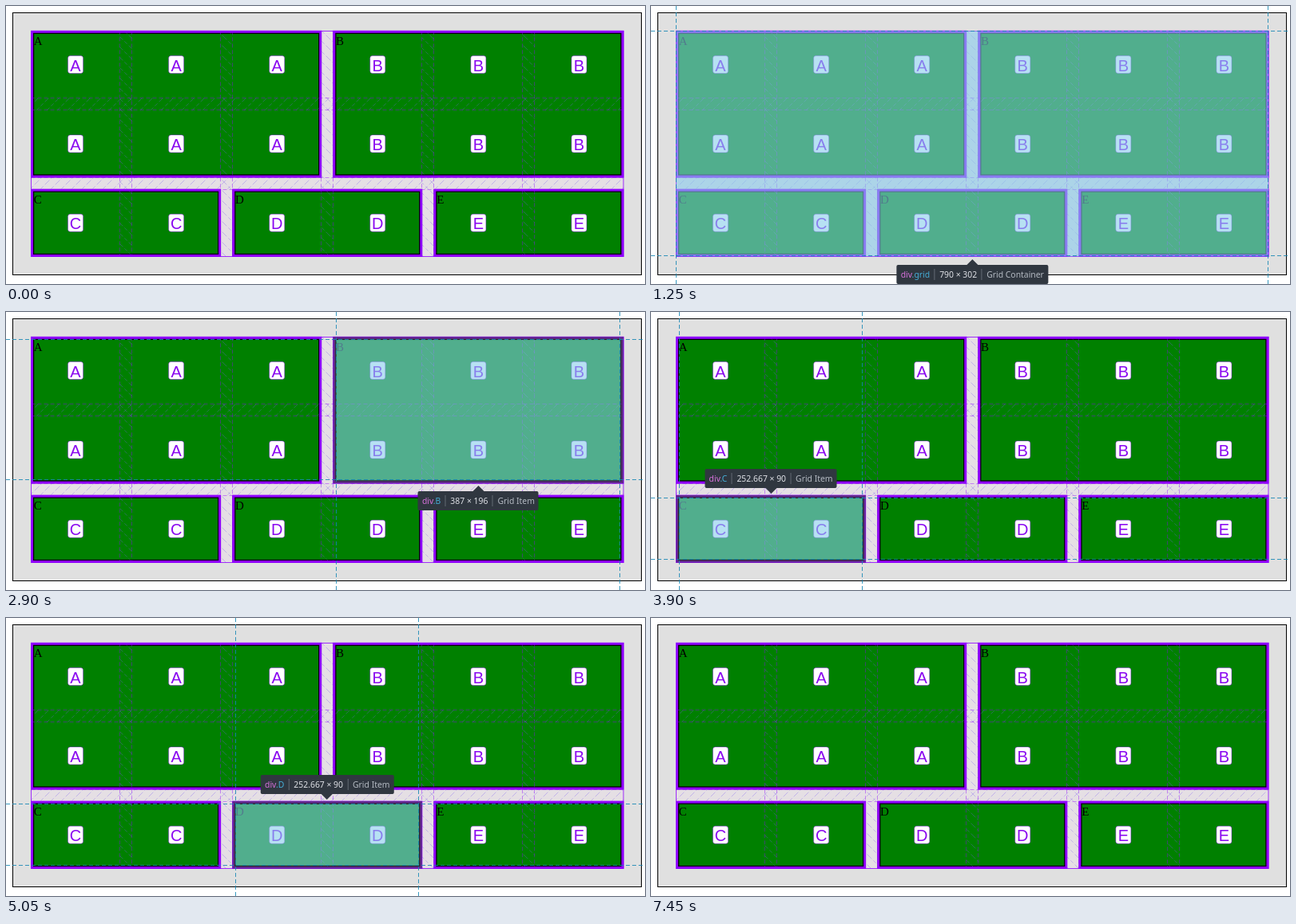
Recreate the animation shown at these times as an HTML page. Size 800 by 349 pixels, loop 8000 ms.

```html
<!DOCTYPE html>
<html lang="en">
<head>
<meta charset="utf-8">
<title>Grid inspector</title>
<style>
  html, body { margin: 0; width: 100%; height: 100%; overflow: hidden; background: #fff; }
  svg { position: absolute; left: 0; top: 0; display: block; }
  .corner { font: 15px "Liberation Serif", serif; }
  .badge { font: 20px "Liberation Sans", sans-serif; fill: #8a08f0; text-anchor: middle; }
  #tip {
    position: absolute; display: flex; align-items: center; height: 24px; padding: 0 5px;
    transform: translateX(-50%); border-radius: 2px; background: #303740; white-space: pre;
    font: 10.4px "Noto Sans", "Open Sans", sans-serif; color: #dfe1e6;
  }
  #tip span + span { margin-left: 5.5px; padding-left: 5.5px; border-left: 1px solid #626a73; }
  #tip b { font-weight: normal; color: #d872dc; }
  #tip i { font-style: normal; color: #45add6; }
  #tip .role { color: #b4bac2; }
  #tip::after {
    content: ""; position: absolute; left: 50%; margin-left: -7px;
    border: 7px solid transparent; border-top-width: 0; border-bottom: 7px solid #303740; top: -7px;
  }
  #tip.above::after { top: 24px; border-top: 7px solid #303740; border-bottom-width: 0; }
  #tip.plain::after { display: none; }
</style>
</head>
<body>
<svg id="stage" width="800" height="349" viewBox="0 0 800 349">
  <defs>
    <pattern id="cols" width="13" height="13" patternUnits="userSpaceOnUse">
      <path d="M0 0L13 13" stroke="#7a5cf0" stroke-opacity=".34" stroke-dasharray="4.7 2.8"/>
    </pattern>
    <pattern id="rows" width="13" height="13" patternUnits="userSpaceOnUse">
      <path d="M13 0L0 13" stroke="#7a5cf0" stroke-opacity=".34" stroke-dasharray="4.7 2.8"/>
    </pattern>
  </defs>
  <g id="page"></g>
  <g id="grid"></g>
  <g id="mark"></g>
</svg>
<div id="tip"></div>
<script>
const $ = id => document.getElementById(id);
const LOOP = 8000, PURPLE = '#8f00ff';
const X0 = 31.5, Y0 = 31.3, X1 = 773, Y1 = 314.5, GAP = 15, BORDER = 3.75;
const COL = (X1 - X0 - 5 * GAP) / 6, ROW = (Y1 - Y0 - 2 * GAP) / 3;
const colX = c => X0 + c * (COL + GAP);
const rowY = r => Y0 + r * (ROW + GAP);
const snap = v => Math.floor(v) + 0.5;

const tag = (name, attrs, text = '') =>
  `<${name} ${Object.entries(attrs).map(([k, v]) => `${k}="${v}"`).join(' ')}>${text}</${name}>`;
const rect = ([l, t, r, b], attrs) =>
  tag('rect', { x: l, y: t, width: r - l, height: b - t, ...attrs });
const line = (x1, y1, x2, y2, attrs) => tag('line', { x1, y1, x2, y2, ...attrs });
const inset = ([l, t, r, b], d) => [l + d, t + d, r - d, b - d];

// name: first column, first row, column span, row span
const areas = { A: [0, 0, 3, 2], B: [3, 0, 3, 2], C: [0, 2, 2, 1], D: [2, 2, 2, 1], E: [4, 2, 2, 1] };
const areaBox = ([c, r, w, h]) =>
  [colX(c), rowY(r), colX(c + w - 1) + COL, rowY(r + h - 1) + ROW];

const all = [X0, Y0, X1, Y1];
const bodyBox = [8, 8, 796, 338];

function drawPage() {
  let out = rect(bodyBox, { fill: '#000' }) + rect(inset(bodyBox, 1), { fill: '#e0e0e0' });
  out += rect(all, { fill: '#e5dfe4' });
  for (const name in areas) {
    const box = areaBox(areas[name]);
    out += rect(box, { fill: '#000' }) + rect(inset(box, BORDER), { fill: '#008000' });
    out += tag('text', { x: box[0] + 3.3, y: box[1] + 17.5, class: 'corner' }, name);
  }
  $('page').innerHTML = out;
}

function drawGrid() {
  const dash = { stroke: PURPLE, 'stroke-opacity': 0.42, 'stroke-dasharray': '5 3' };
  let out = '';
  for (let c = 1; c < 6; c++) {
    const r = colX(c), l = r - GAP;
    out += rect([l, Y0, r, Y1], { fill: 'url(#cols)' });
    for (const x of [l, r]) out += line(snap(x), Y0, snap(x), Y1, dash);
  }
  for (let i = 1; i < 3; i++) {
    const b = rowY(i), t = b - GAP;
    out += rect([X0, t, X1, b], { fill: 'url(#rows)' });
    for (const y of [t, b]) out += line(X0, snap(y), X1, snap(y), dash);
  }
  out += rect([31.5, 31.5, 773, 314.5], { fill: 'none', stroke: PURPLE, 'stroke-opacity': 0.8 });
  for (const name in areas) {
    const [c0, r0, w, h] = areas[name];
    out += rect(inset(areaBox(areas[name]), 1), { fill: 'none', stroke: PURPLE, 'stroke-width': 3 });
    for (let c = c0; c < c0 + w; c++) {
      for (let r = r0; r < r0 + h; r++) {
        const x = colX(c) + COL / 2, y = rowY(r) + ROW / 2;
        out += rect([x - 9.5, y - 11, x + 9.5, y + 11],
          { rx: 3, fill: '#fff', stroke: PURPLE, 'stroke-opacity': 0.5, 'stroke-width': 0.8 });
        out += tag('text', { x, y: y + 8, class: 'badge' }, name);
      }
    }
  }
  $('grid').innerHTML = out;
}

const boxPath = ([l, t, r, b]) => `M${l} ${t}H${r}V${b}H${l}Z`;
const ring = (outer, inner, fill) =>
  tag('path', { d: boxPath(outer) + boxPath(inner), fill, 'fill-rule': 'evenodd', opacity: 0.6 });

function guides([l, t, r, b]) {
  const style = { stroke: '#1687b4', 'stroke-opacity': 0.85, 'stroke-dasharray': '5 3' };
  return [l, r].map(x => line(snap(x), 0, snap(x), 349, style)).join('') +
    [t, b].map(y => line(0, snap(y), 800, snap(y), style)).join('');
}

function showTip(x, y, side, name, cls, size, role) {
  const tip = $('tip');
  tip.style.left = x + 'px';
  tip.style.top = y + 'px';
  tip.className = side;
  tip.innerHTML = `<span><b>${name}</b><i>${cls}</i></span><span>${size}</span>` +
    (role ? `<span class="role">${role}</span>` : '');
}

function inspect(key) {
  $('tip').style.display = key ? 'flex' : 'none';
  let content = all, out = '';
  if (key === 'body') {
    const padding = inset(bodyBox, 1);
    out += ring([0, 0, 800, 345.5], bodyBox, '#edff64') +
      ring(bodyBox, padding, '#444') + ring(padding, all, '#6a5acd');
    showTip(402, 2, 'plain', 'body', '', '840 × 352');
  } else if (key === 'grid') {
    showTip(402.3, 325, 'below', 'div', '.grid', '790 × 302', 'Grid Container');
  } else if (key) {
    const box = areaBox(areas[key]), tall = areas[key][3] === 2;
    content = inset(box, BORDER);
    out += ring(box, content, '#444');
    showTip((box[0] + box[2]) / 2, tall ? 225 : 197, tall ? 'below' : 'above',
      'div', '.' + key, tall ? '387 × 196' : '252.667 × 90', 'Grid Item');
  }
  if (key) out += rect(content, { fill: '#87ceeb', opacity: 0.6 }) + guides(inset(content, -0.1).map((v, i) => i > 1 ? v - 0.7 : v));
  $('mark').innerHTML = out;
}

const steps = [
  [0, ''], [500, 'body'], [1100, 'grid'], [1950, 'A'], [2900, 'B'],
  [3900, 'C'], [4900, 'D'], [5950, 'E'], [7300, '']
];

let shown = null;
function tick() {
  const t = performance.now() % LOOP;
  const key = steps.filter(s => s[0] <= t).pop()[1];
  if (key !== shown) inspect(shown = key);
  requestAnimationFrame(tick);
}

drawPage();
drawGrid();
tick();
</script>
</body>
</html>
```
